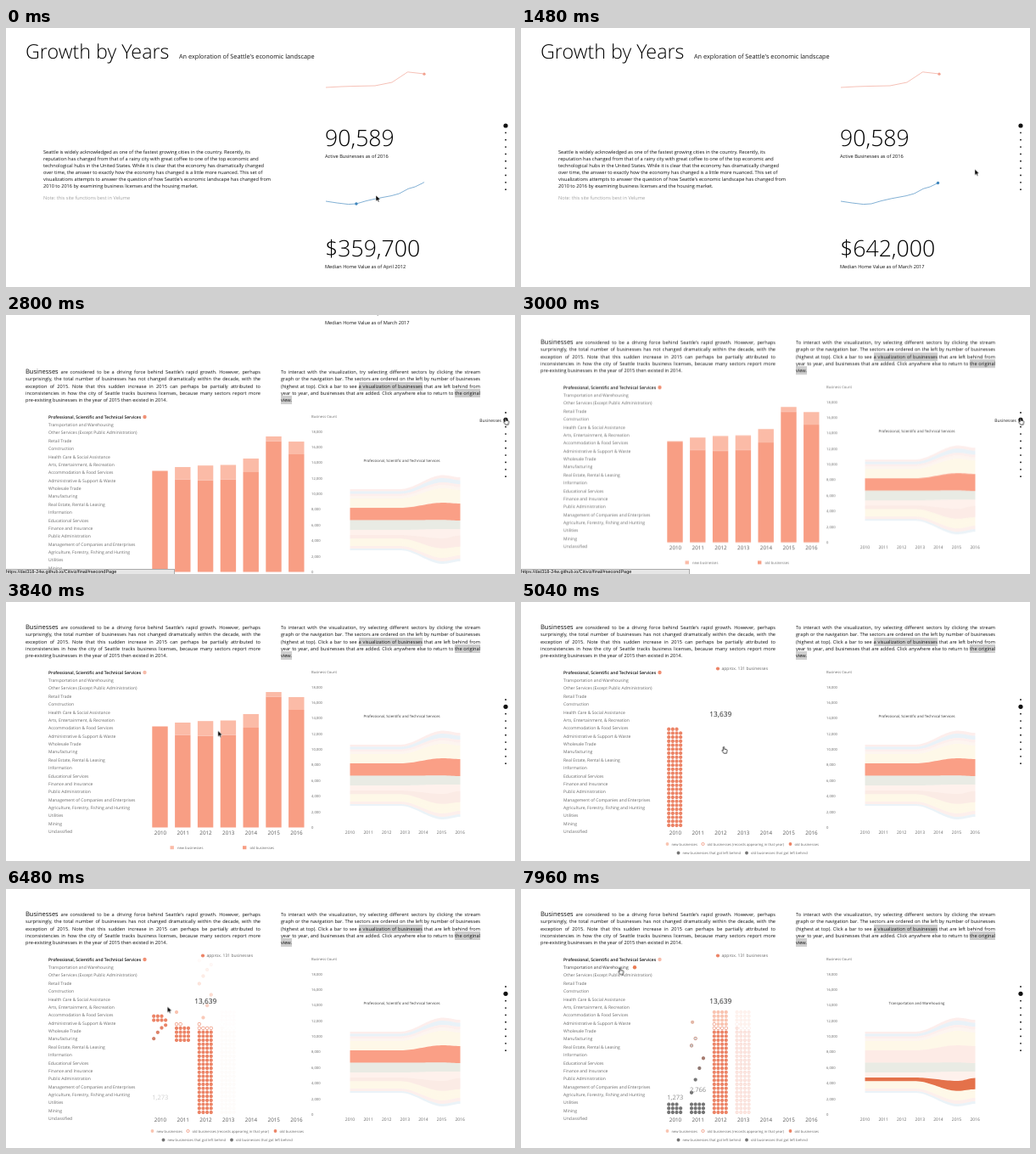
An HTML page with a canvas for the animation above (8000 ms loop, 600x305 px).

```html
<!DOCTYPE html>
<html lang="en">
<head>
<meta charset="utf-8">
<title>Economic landscape</title>
<style>
html, body { margin: 0; width: 100%; height: 100%; overflow: hidden; background: #fff; }
body { position: relative; font-family: "Open Sans", "Noto Sans", sans-serif; color: #111; text-rendering: geometricPrecision; }
svg, canvas, .page, .para, .status { position: absolute; left: 0; top: 0; }
svg { overflow: visible; }
.page { width: 600px; height: 620px; animation: scroll 8s infinite; }
.para { font-size: 5.63px; white-space: nowrap; }
.para div { height: var(--lh); line-height: var(--lh); }
.just div { text-align: justify; text-align-last: justify; white-space: normal; }
.just div:last-child { text-align-last: left; }
.para b { font-size: 7.5px; font-weight: 400; line-height: 1px; }
.para mark { background: #cfcfcf; color: inherit; padding: 1px 0; }
.note { color: #a0a0a0; }
.status { top: 299px; width: 199px; height: 6px; overflow: hidden; background: #e6e6e6;
  border-top: .5px solid #aaa; border-right: .5px solid #aaa; box-sizing: border-box;
  font: 5.5px/6px "Liberation Sans", Arial, sans-serif; color: #000; white-space: nowrap; }

.status { animation: status 8s infinite; }
.navLabel { animation: navLabel 8s infinite; }
.first { animation: first 8s infinite; }
.second { animation: second 8s infinite; }
.bars { animation: bars 8s infinite; }
.dotUi { animation: dotUi 8s infinite; }
.sumA { animation: sumA 8s infinite; }
.sumB { animation: sumB 8s infinite; }
.marker { animation: marker 8s infinite; }
.hoverOn { animation: hoverOn 8s infinite; }
.hoverOff { animation: hoverOff 8s infinite; }
.band { opacity: .2; }
.lead { animation: lead 8s infinite; }
.next { animation: next 8s infinite; }
.cursor { animation: cursor 8s infinite; }
.hand { animation: hand 8s infinite; }
.arrow { animation: arrow 8s infinite; }

@keyframes scroll {
  0%, 29.97% { transform: translateY(0); animation-timing-function: ease; }
  38.48%, 100% { transform: translateY(-309px); }
}
@keyframes status { 0%, 26% { opacity: 0; } 26.01%, 40.5% { opacity: 1; } 41.5%, 100% { opacity: 0; } }
@keyframes navLabel { 0%, 25.5% { opacity: 0; } 26%, 39.4% { opacity: 1; } 40%, 100% { opacity: 0; } }
@keyframes first { 0%, 29.99% { r: 2.6px; } 31%, 100% { r: .9px; } }
@keyframes second { 0%, 25.4% { r: .9px; } 26%, 100% { r: 2.6px; } }
@keyframes bars { 0%, 53.7% { opacity: 1; } 57.5%, 100% { opacity: 0; } }
@keyframes dotUi { 0%, 54% { opacity: 0; } 58%, 100% { opacity: 1; } }
@keyframes sumA { 0%, 79% { opacity: 0; } 87%, 100% { opacity: 1; } }
@keyframes sumB { 0%, 88.7% { opacity: 0; } 98%, 100% { opacity: 1; } }
@keyframes marker { 0%, 44% { opacity: 1; } 46%, 53% { opacity: .6; } 55%, 89% { opacity: 1; } 91%, 100% { opacity: .6; } }
@keyframes hoverOn { 0%, 88.99% { opacity: 0; } 89%, 100% { opacity: 1; } }
@keyframes hoverOff { 0%, 88.99% { opacity: 1; } 89%, 100% { opacity: 0; } }
@keyframes lead { 0%, 89% { opacity: 1; } 93%, 100% { opacity: .2; } }
@keyframes next { 0%, 89% { opacity: .14; } 93%, 100% { opacity: 1; } }
@keyframes cursor {
  0% { transform: translate(436px, 197px); animation-timing-function: linear; }
  10.5% { transform: translate(487px, 192px); }
  13.5%, 16.25% { transform: translate(501px, 196px); }
  25.5%, 39.4% { transform: translate(586.5px, 121px); }
  47%, 48% { transform: translate(249.8px, 151.5px); }
  52%, 73.5% { transform: translate(236.7px, 170px); }
  81% { transform: translate(190.3px, 138.5px); }
  90%, 100% { transform: translate(114.6px, 92.5px); }
}
@keyframes hand {
  0%, 25.4% { opacity: 0; } 25.41%, 39.6% { opacity: 1; } 39.61%, 50% { opacity: 0; }
  50.01%, 74.5% { opacity: 1; } 74.51%, 88.9% { opacity: 0; } 88.91%, 100% { opacity: 1; }
}
@keyframes arrow {
  0%, 25.4% { opacity: 1; } 25.41%, 39.6% { opacity: 0; } 39.61%, 50% { opacity: 1; }
  50.01%, 74.5% { opacity: 0; } 74.51%, 88.9% { opacity: 1; } 88.91%, 100% { opacity: 0; }
}
</style>
</head>
<body>
<div class="page">
  <svg id="art" width="600" height="620"></svg>

  <div class="para" style="left:44px;top:142px;--lh:8.1px">
    <div>Seattle is widely acknowledged as one of the fastest growing cities in the country. Recently, its</div>
    <div>reputation has changed from that of a rainy city with great coffee to one of the top economic and</div>
    <div>technological hubs in the United States. While it is clear that the economy has dramatically changed</div>
    <div>over time, the answer to exactly how the economy has changed is a little more nuanced. This set of</div>
    <div>visualizations attempts to answer the question of how Seattle's economic landscape has changed from</div>
    <div>2010 to 2016 by examining business licenses and the housing market.</div>
    <div class="note" style="margin-top:5.5px">Note: this site functions best in Velume</div>
  </div>

  <div class="para just" style="left:23px;top:335px;width:277px;--lh:8.25px">
    <div><b>Businesses</b> are considered to be a driving force behind Seattle's rapid growth. However, perhaps</div>
    <div>surprisingly, the total number of businesses has not changed dramatically within the decade, with the</div>
    <div>exception of 2015. Note that this sudden increase in 2015 can perhaps be partially attributed to</div>
    <div>inconsistencies in how the city of Seattle tracks business licenses, because many sectors report more</div>
    <div>pre-existing businesses in the year of 2015 then existed in 2014.</div>
  </div>

  <div class="para just" style="left:324px;top:335px;width:235px;--lh:8.25px">
    <div>To interact with the visualization, try selecting different sectors by clicking the stream</div>
    <div>graph or the navigation bar. The sectors are ordered on the left by number of businesses</div>
    <div>(highest at top). Click a bar to see <mark>a visualization of businesses</mark> that are left behind from</div>
    <div>year to year, and businesses that are added. Click anywhere else to return to <mark>the original</mark></div>
    <div><mark>view.</mark></div>
  </div>
</div>

<canvas id="dots"></canvas>
<div class="status">https://dat318-24w.github.io/Citiviz/final/#secondPage</div>
<svg id="over" width="600" height="305">
  <g id="nav"></g>
  <g id="sums"></g>
  <g class="cursor">
    <path class="arrow" d="M0 0V7.2L1.7 5.6 2.8 8.1 4 7.6 2.9 5.1H5.2Z" fill="#000" stroke="#fff" stroke-width=".5"/>
    <path class="hand" d="M1.6 .8Q2.3 0 2.9 .8V3.2L5.4 3.6Q6.4 3.9 6.2 5L5.6 8.2H2.3L.3 5.4Q-.2 4.5 .6 4.4L1.6 5Z" fill="#fff" stroke="#000" stroke-width=".7"/>
  </g>
</svg>

<script>
const LOOP = 8000, PAGE2 = 309;
const SOLID = [236, 132, 103], LIGHT = [249, 196, 177], DARK = [118, 118, 118], WHITE = [255, 255, 255];
const rgb = c => `rgb(${c.map(Math.round)})`;
const clamp = v => Math.max(0, Math.min(1, v));
const ramp = (t, a, d) => clamp((t - a) / d);
const $ = id => document.getElementById(id);

function el(parent, tag, attrs, text) {
  const e = document.createElementNS('http://www.w3.org/2000/svg', tag);
  for (const k in attrs) e.setAttribute(k, attrs[k]);
  if (text !== undefined) e.textContent = text;
  return parent.appendChild(e);
}
// y is the visual middle of the text
const label = (p, x, y, size, text, attrs = {}) =>
  el(p, 'text', { x, y: y + size * .36, 'font-size': size, fill: '#666', ...attrs }, text);
const circle = (p, cx, cy, r, fill, attrs = {}) => el(p, 'circle', { cx, cy, r, fill, ...attrs });
const mid = { 'text-anchor': 'middle' };
const ink = { fill: '#111' };
const thin = { 'font-weight': 300, fill: '#000' };

// ---- first page
const art = $('art');
label(art, 23, 27.2, 23.3, 'Growth by Years', thin);
label(art, 204, 33, 7.3, "An exploration of Seattle's economic landscape", ink);
label(art, 376, 129, 26.67, '90,589', thin);
label(art, 376, 150.5, 5.65, 'Active Businesses as of 2016', ink);
const price = label(art, 376, 259, 26.67, '', thin);
const when = label(art, 376, 280.5, 5.65, '', ink);

const line = (pts, stroke) => el(art, 'polyline', { points: pts.join(' '), fill: 'none', stroke, 'stroke-width': .65 });
line([[377, 70], [395, 69], [411, 68.5], [435, 68], [455, 64], [473.5, 51.8], [493, 54]], '#f2a090');
circle(art, 493, 54.2, 1.6, '#f2a08e');

const home = [[0, 204], [10, 206], [20, 207.6], [27, 207], [36, 203.5], [45, 200.8], [58, 197.6],
  [65, 195], [73, 189.3], [79, 187], [86, 182.5]];
const monthX = m => 377 + 1.331 * m;
function homeY(m) {
  const i = Math.max(1, home.findIndex(p => p[0] >= m));
  const [a, b] = [home[i - 1], home[i]];
  return a[1] + (b[1] - a[1]) * (m - a[0]) / (b[0] - a[0]);
}
line([...home.map(([m, y]) => [monthX(m), y]), [493, 181.5]], '#3f86bd');
const homeDot = circle(art, 0, 0, 1.7, '#3f86bd');
const MONTHS = 'January February March April May June July August September October November December'.split(' ');

// ---- second page
const p2 = el(art, 'g', { transform: `translate(0 ${PAGE2})` });
const sectors = `Professional, Scientific and Technical Services|Transportation and Warehousing|Other Services (Except Public Administration)|Retail Trade|Construction|Health Care & Social Assistance|Arts, Entertainment, & Recreation|Accommodation & Food Services|Administrative & Support & Waste|Wholesale Trade|Manufacturing|Real Estate, Rental & Leasing|Information|Educational Services|Finance and Insurance|Public Administration|Management of Companies and Enterprises|Agriculture, Forestry, Fishing and Hunting|Utilities|Mining|Unclassified`.split('|');
const sectorStyle = [{ 'font-weight': 600, fill: '#111' }, { class: 'hoverOff' }];
sectors.forEach((s, i) => label(p2, 50, 82.8 + i * 9.38, 5, s, sectorStyle[i]));
circle(p2, 163.5, 83, 2.2, '#f08f73', { class: 'marker' });
const hover = el(p2, 'g', { class: 'hoverOn' });
label(hover, 50, 92.18, 5, sectors[1], { fill: '#333' });
circle(hover, 134, 92.2, 2.2, '#ea7d55');

// bars: [total, old] in pixels
const bars = el(p2, 'g', { class: 'bars' });
[[119, 119], [123.5, 109], [125.3, 107.8], [126, 109], [133.5, 117.5], [159.5, 154], [153.5, 138.5]].forEach(([total, old], i) => {
  const x = 172.3 + i * 26.8;
  const bar = (h0, h1, fill) => el(bars, 'rect', { x, y: 265.5 - h1, width: 18.4, height: h1 - h0, fill });
  bar(0, old, '#f89e84');
  bar(old, total, '#fbbba7');
  label(p2, 182 + i * 26.75, 271.3, 6.25, 2010 + i, { ...mid, fill: '#555' });
  label(p2, 405.5 + i * 21.6, 271.3, 5, 2010 + i, mid);
});
[[193.5, 202, '#fbbba7', 'new businesses'], [279, 287.5, '#f89e84', 'old businesses']].forEach(([x, tx, fill, s]) => {
  el(bars, 'rect', { x, y: 287.2, width: 4.4, height: 4, fill });
  label(bars, tx, 289, 4.17, s);
});

const dotUi = el(p2, 'g', { class: 'dotUi' });
circle(dotUi, 232, 78.5, 2.1, rgb(SOLID));
label(dotUi, 236.5, 78.5, 5, 'approx. 131 businesses');
[[172.5, 285, LIGHT, 'new businesses'], [214.5, 285, null, 'old businesses (records appearing in that year)'],
 [317.5, 285, SOLID, 'old businesses'], [185.5, 295.5, DARK, 'new businesses that got left behind'],
 [266, 295.5, DARK, 'old businesses that got left behind']].forEach(([x, y, c, s]) => {
  circle(dotUi, x, y, c ? 1.9 : 1.6, c ? rgb(c) : '#fff', c ? {} : { stroke: rgb(SOLID), 'stroke-width': .7 });
  label(dotUi, x + 5, y, 4.17, s);
});

// stream graph: band edges at the left, the peak and the right
label(p2, 360, 82.8, 4.17, 'Business Count');
for (let k = 0; k < 10; k++) label(p2, 360, 265.5 - k * 18.38, 4.17, (k * 2000).toLocaleString('en-US'));
const edges = [[168, 151.5, 154], [170.5, 155, 157.5], [173.5, 160, 162], [176, 163, 165.5], [179, 167, 169],
  [190, 184, 185], [204.5, 204.3, 205], [216, 215, 215], [222, 226, 222.5], [226.3, 237.8, 235.8],
  [231, 244, 241], [235, 249, 246], [238, 253, 250], [240, 256, 253]];
const fills = ['#f4a9a0', '#8fbfdd', '#f6b0a5', '#f6cdb5', '#f7dd8c', '#fa9f86', '#8f9c7a', '#fbb9a2', '#e4714a',
  '#f7dd8c', '#f7dd8c', '#f5b0a0', '#9cc3dc'];
const smooth = v => (v = clamp(v), v * v * (3 - 2 * v));
const edgeY = ([l, p, r], x) => x < 515 ? l + (p - l) * smooth((x - 465) / 50) : p + (r - p) * smooth((x - 515) / 20.5);
const xs = Array.from({ length: 53 }, (_, i) => 405.5 + i * 2.5);
fills.forEach((fill, i) => {
  const side = e => xs.map(x => [x, edgeY(e, x).toFixed(2)]);
  el(p2, 'polygon', {
    points: [...side(edges[i]), ...side(edges[i + 1]).reverse()].join(' '), fill,
    class: 'band' + (i === 5 ? ' lead' : i === 8 ? ' next' : '')
  });
});
label(p2, 466.5, 134, 4.3, sectors[0], { ...mid, class: 'hoverOff', fill: '#333' });
label(p2, 466.5, 134, 4.3, sectors[1], { ...mid, class: 'hoverOn', fill: '#333' });

// ---- navigation and sums
const nav = $('nav');
for (let i = 0; i < 10; i++) circle(nav, 589, 115 + i * 8.35, .9, '#111', { class: ['first', 'second'][i] || '' });
label(nav, 584, 124, 5, 'Businesses', { 'text-anchor': 'end', class: 'navLabel', fill: '#222' });
const sum = (x, y, size, s, cls, fill) => label($('sums'), x, y, size, s, { ...mid, class: cls, fill });
sum(235.3, 132, 8.33, '13,639', 'dotUi', '#222');
sum(181.8, 245, 7.5, '1,273', 'sumA', '#8a8a8a');
sum(208.5, 236, 7.5, '2,766', 'sumB', '#8a8a8a');

// ---- unit dots
const cv = $('dots'), ctx = cv.getContext('2d'), dpr = Math.max(2, window.devicePixelRatio || 1);
cv.width = 600 * dpr; cv.height = 305 * dpr;
cv.style.width = '600px'; cv.style.height = '305px';
ctx.scale(dpr, dpr);

const spot = (year, i) => [174.2 + year * 26.8 + (i % 4) * 4.65, 263 - Math.floor(i / 4) * 4.72];
const mix = (a, b, p) => a.map((v, i) => v + (b[i] - v) * p);
function dot([x, y], kind, alpha = 1, dark = 0) {
  if (alpha <= 0) return;
  const fill = kind === 'open' ? WHITE : kind === 'new' ? LIGHT : SOLID;
  const rim = kind === 'open' ? SOLID : fill;
  ctx.globalAlpha = alpha;
  ctx.fillStyle = rgb(mix(fill, DARK, dark));
  ctx.strokeStyle = rgb(mix(rim, DARK, dark));
  ctx.lineWidth = .6;
  ctx.beginPath();
  ctx.arc(x, y, 1.8, 0, 7);
  ctx.fill();
  ctx.stroke();
}
const between = (a, b, p) => mix(a, b, p);
const range = (a, b) => Array.from({ length: b - a }, (_, i) => a + i);

// each year: kept-over dots, reappearing ones, then new ones
const kind = (i, kept, open) => i < kept ? 'old' : i < kept + open ? 'open' : 'new';
const kind11 = i => kind(i, 88, 2);
const left11 = [...range(72, 90), 100];
const stay11 = range(0, 103).filter(i => !left11.includes(i));

function arrive(t, year, from, count, open, start, step, dur) {
  for (let j = 0; j < open; j++) dot(spot(year, from + j), 'open', ramp(t, start - 80, 250));
  for (let j = 0; j < count; j++) {
    const end = spot(year, from + open + j), p = ramp(t, start + j * step, dur) ** 2;
    dot(between([end[0], 80], end, p), 'new', p);
  }
}
function leave(t, year, list, kindOf, start) {
  list.forEach((i, j) => {
    const p = ramp(t, start + j * 40, 400) ** 2;
    dot(between(spot(year, i), spot(year, j), p), kindOf(i), 1, Math.min(1, p * 1.4));
  });
}

function drawDots(t) {
  ctx.clearRect(0, 0, 600, 305);
  if (t < 4400) return;
  const T11 = 5120, T12 = 5900;

  // faint preview of the year after
  const ghost = .2 * ramp(t, 6400, 600);
  range(0, 104).forEach(i => dot(spot(3, i), kind(i, 85, 4), ghost));

  if (t < T11) {
    range(0, 99).forEach(i => dot(spot(0, i), 'old', ramp(t, 4400 + i * 3, 140)));
    return;
  }
  leave(t, 0, range(88, 99), () => 'old', 6318);
  if (t < T12) {
    range(0, 88).forEach(i => dot(between(spot(0, i), spot(1, i), smooth(ramp(t, T11 + i * 2, 400))), 'old'));
    arrive(t, 1, 88, 13, 2, 5240, 20, 350);
  } else {
    leave(t, 1, left11, kind11, 7102);
    stay11.forEach((i, j) => {
      const p = smooth(ramp(t, T12 + j * 2, 380));
      dot(between(spot(1, i), spot(2, j), p), p < .5 ? kind11(i) : 'old');
    });
    arrive(t, 2, 84, 15, 5, 6100, 40, 400);
  }
}

function drawHome(t) {
  const m = Math.round(27 + 59 * ramp(t, 0, 1000)), y = homeY(m);
  homeDot.setAttribute('cx', monthX(m));
  homeDot.setAttribute('cy', y);
  const value = Math.round((359700 + (207 - y) * 11522) / 100) * 100;
  price.textContent = '$' + value.toLocaleString('en-US');
  when.textContent = `Median Home Value as of ${MONTHS[m % 12]} ${2010 + Math.floor(m / 12)}`;
}

let start;
function frame(now) {
  start ??= now;
  const t = (now - start) % LOOP;
  drawHome(t);
  drawDots(t);
  requestAnimationFrame(frame);
}
drawHome(0);
requestAnimationFrame(frame);
</script>
</body>
</html>
```
